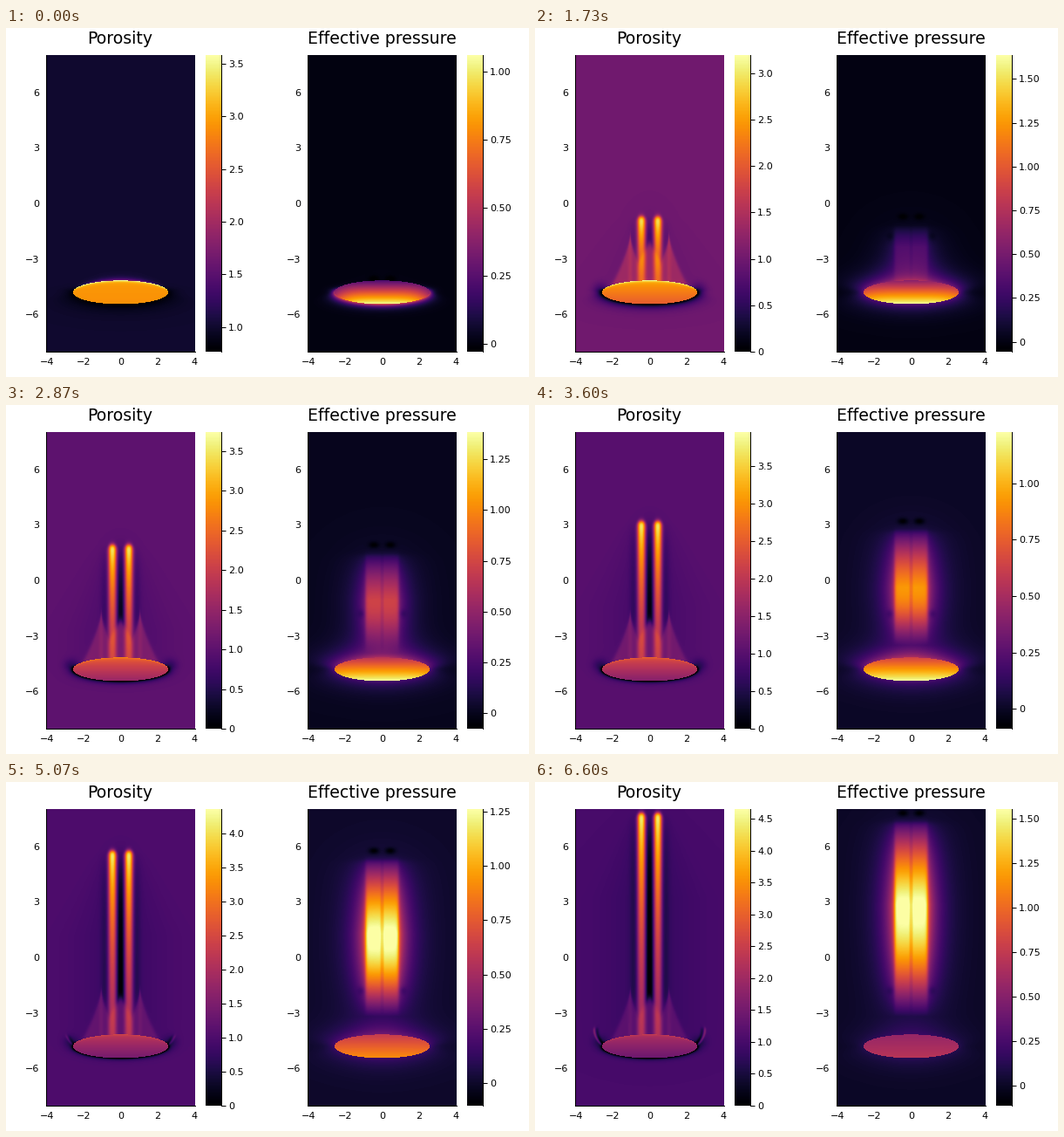
A matplotlib script for the animation above (6.67 s loop, 600 by 400 pixels).

```python
import numpy as np
import matplotlib.pyplot as plt
from matplotlib.animation import FuncAnimation

W, H, DPI = 600, 400, 100
FRAMES, LOOP_MS = 100, 6670
PX = 72 / DPI  # points per pixel

plt.rcParams.update({"font.family": "DejaVu Sans", "font.size": 8,
                     "axes.linewidth": PX})

# Cell-centred grid
NX, NY = 170, 340
XE, YE = 4.03, 8.03
X, Y = np.meshgrid(np.linspace(-4, 4, NX), np.linspace(-8, 8, NY))
A = np.abs(X)

# Elliptic source: relative height, distance outside and depth inside
RX, RY, YC = 2.57, 0.64, -4.81
U = (Y - YC) / RY
R = np.hypot(X / RX, U) + 1e-6
DIST = (R - 1) * R / (np.hypot(X / RX**2, U / RY) + 1e-6)
OUT, DEPTH = np.maximum(DIST, 0), np.maximum(-DIST, 0)
INSIDE = R < 1

# Final outline of the spread-out plume: two side peaks and a middle one
PLUME = np.maximum(-1.7 - 2.75 * np.abs(A - 1.03) ** 0.7, -2.1 - 1.8 * A)


def step(v, width):
    return 0.5 * (1 + np.tanh(v / (2 * width)))


def bell(v, width):
    return np.exp(-(v / width) ** 2)


def grow(t, tau):
    return 1 - np.exp(-max(t, 0) / tau)


def head(t):
    """Height reached by the two channels."""
    return -4.1 + (15.8 * t - 3.75 * t**2) * grow(t, 0.11)


def porosity(t):
    yh = head(t)
    s = yh - Y
    behind = np.maximum(s, 0)
    peak = 1 + (4.5 - 3.13 * np.exp(-1.33 * t)) * (1 - bell(t, 0.135))
    rim = 2.45 + 1.13 * bell(t, 0.37)
    lo, hi = max(0, 0.777 - 3.5 * t), max(rim, peak)

    # Broad drained zone beside the channels
    wide = np.clip(0.8 + 0.35 * behind, 0, 2.4)
    phi = 1 - 0.2 * grow(t, 0.3) * bell(A, wide) * step(s, 0.3) * step(Y + 5, 0.3)

    # Compacted edge under the ellipse and at its tips
    reach = 0.08 + 0.25 * bell(t, 0.28)
    phi -= min(0.22 + 3.5 * t, 1.2) * np.exp(-OUT / reach) * step(-4.65 - Y, 0.07)
    phi -= 0.4 * grow(t, 0.2) * bell(A - 2.65, 0.4) * bell(Y + 4.6, 0.35)

    # Drained gap between and just outside the channels
    gap = 0.9 * bell(X, 0.2) * step(Y + 2.2 + 1.8 * A, 0.12)
    gap += 0.25 * bell(A - 0.85, 0.22) * step(Y + 2.4, 0.2)
    phi -= grow(t, 0.2) * (1 - np.exp(-behind / 1.8)) * gap

    # Plume
    env = np.minimum(PLUME, -4.2 + 12.2 * t - 0.15 * A**2)
    body = step(env - Y, 0.12) * step(Y - YC, 0.1)
    phi += body * (0.33 + 0.17 * np.exp(-t / 0.4) + 0.15 * bell(A - 1.03, 0.13))

    # Channels
    dx = A - 0.42
    col = np.exp(-behind / max(4 + 0.75 * yh, 1.5)) * np.exp(-np.abs(dx / 0.23) ** 2.5)
    col *= step(s - 1.5 * dx**2, 0.07) * step(Y - YC, 0.1)
    phi += (peak - 1) * col

    # Thin horns growing from the tips
    late = np.clip((t - 0.5) / 0.5, 0, 1)
    bend = A - 2.98 + 0.35 * ((Y + 3.9) / 0.8) ** 2
    span = step(-4.7 + 0.9 * late - Y, 0.05) * step(Y + 4.75, 0.05)
    phi += 0.7 * late * span * (bell(bend, 0.07) - 0.6 * bell(bend + 0.15, 0.1))

    # Ellipse interior
    upper = 2.05 + 0.9 * np.exp(-t / 0.4)
    lower = 1.4 + 1.5 * bell(t, 0.27)
    core = lower + (upper - lower) * (U + 1) / 2
    edge = np.exp(-DEPTH / 0.07) * step(U - 0.25, 0.08)
    core += (rim - upper) * edge
    fringe = 0.6 * np.exp(-t / 0.12) * np.exp(-OUT / 0.08 - (X / 1.9) ** 4)
    phi += fringe * step(Y + 4.5, 0.05)
    return np.where(INSIDE, core, phi), lo, hi


def pressure(t):
    yh = head(t)
    s = yh - Y
    src = 2.35 * np.exp(-1.22 * t) - 1.28 * bell(t, 0.155)
    shaft = 2.8 * grow(t - 0.14, 1 / 0.96)
    lo = -0.03 - 0.1 * grow(t - 0.1, 0.5)
    hi = max(src, shaft)

    # Ellipse, bright at its base, and the halo round it
    upper = src * (0.2 + 0.6 * t)
    core = upper + (src - upper) * (1 - U) / 2
    core *= 1 - 0.4 * np.exp(-t / 0.2) * (X / RX) ** 4
    reach = 0.15 + 0.25 * grow(t, 0.15)
    below = src * (0.12 + 0.45 * np.exp(-t / 0.15)) * step(-4.7 - Y, 0.1)
    above = 0.85 * upper * bell(t, 0.75) * grow(t, 0.08) * step(Y + 4.7, 0.1)
    p = (below + above) * np.exp(-OUT / reach)
    p += 0.25 * grow(t, 0.15) * bell(t, 0.8) * bell(A, 1.8) * bell(Y + 4.3, 1.4) \
        * step(Y + 4.9, 0.15)

    # Shaft behind the channel heads
    top, mid = yh - 0.45, -4.2 + 7.2 * t
    base = -5 + 1.8 * np.clip((t - 0.2) / 0.4, 0, 1)
    rise = np.clip((top - Y) / (top - mid), 0, 1)
    foot = np.clip((Y - base) / (mid - base), 0, 1)
    along = (0.1 + 0.9 * rise * (1.45 - 0.45 * rise)) * step(top - Y, 0.08)
    along *= np.sin(np.pi / 2 * foot)
    inner = step(0.86 - A, 0.045)
    flank = 0.55 * np.exp(-np.maximum(A - 0.86, 0) / 0.55)
    p += shaft * along * (inner * (1 - 0.12 * bell(X, 0.07)) + (1 - inner) * flank)
    p += 0.06 * grow(t, 0.3) * bell(A, 2.4) * step(s, 0.6) * step(Y + 6, 0.4)

    # Suction at the heads and the plume shoulders
    p += (lo - 0.02) * bell(A - 0.42, 0.27) * bell(s, 0.17)
    p -= 0.08 * grow(t - 0.15, 0.1) * bell(A - 1.1, 0.2) * bell(Y + 1.8, 0.22)
    return np.where(INSIDE, core, p), lo, hi


def box(x, y, w, h):
    return fig.add_axes([x / W, 1 - (y + h) / H, w / W, h / H])


class Panel:
    def __init__(self, x, title, field, tick, digits):
        self.field, self.tick, self.digits = field, tick, digits
        fig.text((x + 85) / W, 1 - 17.5 / H, title, fontsize=13.6, ha="center")
        ax = box(x, 31, 171, 340)
        self.im = ax.imshow(np.zeros((NY, NX)), cmap="inferno", origin="lower",
                            extent=(-XE, XE, -YE, YE), aspect="auto",
                            interpolation="nearest")
        ax.spines[["top", "right"]].set_visible(False)
        ax.set_xticks(range(-4, 5, 2))
        ax.set_yticks(range(-6, 7, 3))
        ax.tick_params(axis="x", length=0, pad=7.5 * PX)
        ax.tick_params(axis="y", length=0, pad=7.5 * PX)

        self.bar = box(x + 183, 31, 18, 340)
        self.ramp = self.bar.imshow(np.arange(256)[:, None], cmap="inferno",
                                    origin="lower", aspect="auto")
        self.bar.spines[["top", "left", "bottom"]].set_visible(False)
        self.bar.set_xticks([])
        self.bar.yaxis.tick_right()
        self.bar.tick_params(axis="y", length=4.5 * PX, width=PX, pad=3.5 * PX)

    def draw(self, t):
        data, lo, hi = self.field(t)
        self.im.set_data(data)
        self.im.set_clim(lo, hi)
        self.ramp.set_extent((0, 1, lo, hi))
        first, last = np.ceil(lo / self.tick), np.floor(hi / self.tick)
        ticks = np.arange(first, last + 1) * self.tick
        self.bar.set_yticks(ticks, [f"{v:.{self.digits}f}" if v else "0" for v in ticks])
        self.bar.set_xlim(0, 1)
        self.bar.set_ylim(lo, hi)


fig = plt.figure(figsize=(W / DPI, H / DPI), dpi=DPI, facecolor="white")
panels = [Panel(46, "Porosity", porosity, 0.5, 1),
          Panel(346, "Effective pressure", pressure, 0.25, 2)]


def update(n):
    for panel in panels:
        panel.draw((n + 0.3) / FRAMES)
    return []


anim = FuncAnimation(fig, update, frames=FRAMES, interval=LOOP_MS / FRAMES,
                     init_func=lambda: update(0), repeat=True, repeat_delay=0)
plt.show()
```
